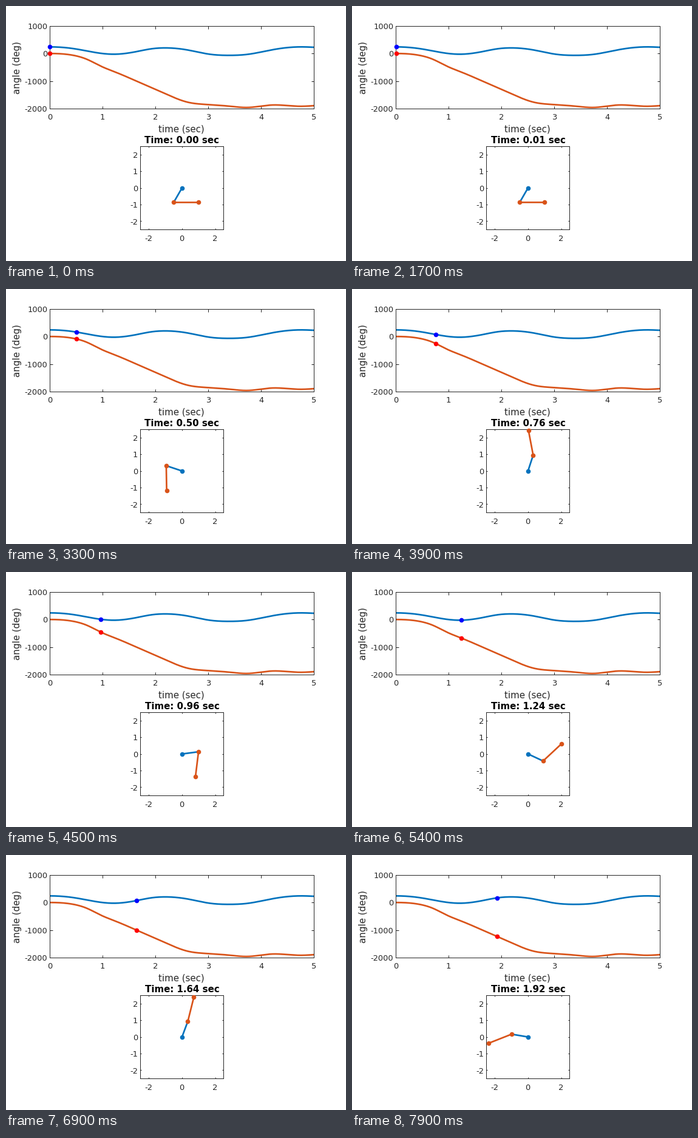
Animation of 560 by 420 pixels, one loop 8 s. Source, as a matplotlib script:

```python
import numpy as np
import matplotlib.pyplot as plt
from matplotlib.animation import FuncAnimation

W, H, DPI = 560, 420, 100
FRAMES, INTERVAL = 80, 100
PX = 72 / DPI  # points per pixel
BLUE, ORANGE, INK = "#0072BD", "#D95319", "#262626"
L1, L2 = 1.0, 1.5

plt.rcParams["font.family"] = "DejaVu Sans"

# Key poses: time in seconds, then both link angles in degrees.
POSES = np.array([
    (0.00, 240, 0), (0.30, 212, -26), (0.50, 161.6, -89), (0.70, 92, -211),
    (0.96, 7.5, -457), (1.24, -25, -677), (1.64, 69.6, -1004),
    (1.92, 170.4, -1238.5), (2.20, 203, -1475), (2.60, 130, -1766),
    (3.00, -20, -1856), (3.40, -67, -1915), (3.75, -29, -1960),
    (4.20, 132, -1872), (4.73, 240, -1918), (5.00, 226, -1895),
])

# Solver clock: step sizes grow fivefold, four frames to a step, then settle.
STARTUP = 2e-5 * (5.0 ** np.arange(7) - 1) / 4
CRUISE = np.array([(24, STARTUP[-1]), (28, 0.246), (33, 0.50), (45, 0.96),
                   (54, 1.24), (69, 1.64), (79, 1.92)])


def spline(x, xs, ys, slope):
    """Cubic spline with a given first slope and a free end."""
    h = np.diff(xs)
    d = np.diff(ys) / h
    n = len(xs)
    a, b = np.eye(n), np.full(n, float(slope))
    for i in range(1, n - 1):
        a[i, i - 1:i + 2] = 1 / h[i - 1], 2 / h[i - 1] + 2 / h[i], 1 / h[i]
        b[i] = 3 * (d[i - 1] / h[i - 1] + d[i] / h[i])
    a[-1, -2:], b[-1] = (1, 2), 3 * d[-1]
    m = np.linalg.solve(a, b)
    i = np.clip(np.searchsorted(xs, x, side="right") - 1, 0, n - 2)
    u, k = (x - xs[i]) / h[i], h[i]
    return ((1 + 2 * u) * (1 - u) ** 2 * ys[i] + u * (1 - u) ** 2 * k * m[i]
            + u * u * (3 - 2 * u) * ys[i + 1] + u * u * (u - 1) * k * m[i + 1])


def angles(t):
    ts, first, second = POSES.T
    return spline(t, ts, first, 0), spline(t, ts, second, 0)


def clock(frame):
    if frame <= 24:
        return np.interp(frame, 4 * np.arange(7), STARTUP)
    return spline(frame, *CRUISE.T, 0.04)


def label(x, y, text, size, ha="center", **kw):
    """Text with its baseline at a pixel position, counted from the top."""
    kw.setdefault("color", INK)
    return fig.text(x / W, 1 - y / H, text, fontsize=size * PX, ha=ha,
                    va="baseline", **kw)


def make_axes(left, top, right, bottom, xlim, ylim, xticks, yticks, tick):
    ax = fig.add_axes([left / W, 1 - bottom / H,
                       (right - left) / W, (bottom - top) / H])
    ax.set(xlim=xlim, ylim=ylim, xticks=xticks, yticks=yticks)
    ax.patch.set_visible(False)
    ax.tick_params(direction="in", length=tick * PX, width=PX, color=INK,
                   top=True, right=True, labelbottom=False, labelleft=False)
    for spine in ax.spines.values():
        spine.set(color=INK, linewidth=PX)
    for v in xticks:
        x = left + (v - xlim[0]) / (xlim[1] - xlim[0]) * (right - left)
        label(x - 0.3, bottom + 18.5, str(v), 13)
    for v in yticks:
        y = bottom - (v - ylim[0]) / (ylim[1] - ylim[0]) * (bottom - top)
        label(left - 4, y + 5, str(v), 13, ha="right")
    return ax


fig = plt.figure(figsize=(W / DPI, H / DPI), dpi=DPI, facecolor="white")

graph = make_axes(72.4, 32.9, 507.4, 168.9, (0, 5), (-2000, 1000),
                  range(6), range(-2000, 1001, 1000), 4.5)
stage = make_axes(221.4, 231.2, 358.4, 368.2, (-2.5, 2.5), (-2.5, 2.5),
                  range(-2, 3, 2), range(-2, 3), 1.6)

label(289.2, 207, "time (sec)", 15)
label(22.5, 102, "angle (deg)", 15, rotation=90, rotation_mode="anchor")
title = label(290, 225.6, "", 15, color="black", weight="bold")

line = dict(lw=2.67 * PX, solid_capstyle="butt", solid_joinstyle="round")
dot = dict(marker="o", ms=7.6 * PX, mew=0, clip_on=False)

times = np.linspace(0, 5, 600)
for curve, color in zip(angles(times), (BLUE, ORANGE)):
    graph.plot(times, curve, color=color, **line)
dots = [graph.plot([], [], color=c, ls="none", zorder=5, **dot)[0]
        for c in ("blue", "red")]
upper, = stage.plot([], [], color=BLUE, markevery=[0], zorder=4, **line, **dot)
lower, = stage.plot([], [], color=ORANGE, zorder=5, **line, **dot)


def update(frame):
    t = clock(frame)
    pose = angles(t)
    for d, a in zip(dots, pose):
        d.set_data([t], [a])
    r1, r2 = np.radians(pose)
    jx, jy = L1 * np.cos(r1), L1 * np.sin(r1)
    upper.set_data([0, jx], [0, jy])
    lower.set_data([jx, jx + L2 * np.cos(r2)], [jy, jy + L2 * np.sin(r2)])
    title.set_text(f"Time: {t:.2f} sec")
    return [*dots, upper, lower, title]


anim = FuncAnimation(fig, update, frames=FRAMES, interval=INTERVAL,
                     repeat=True, repeat_delay=0, blit=False)
plt.show()
```
